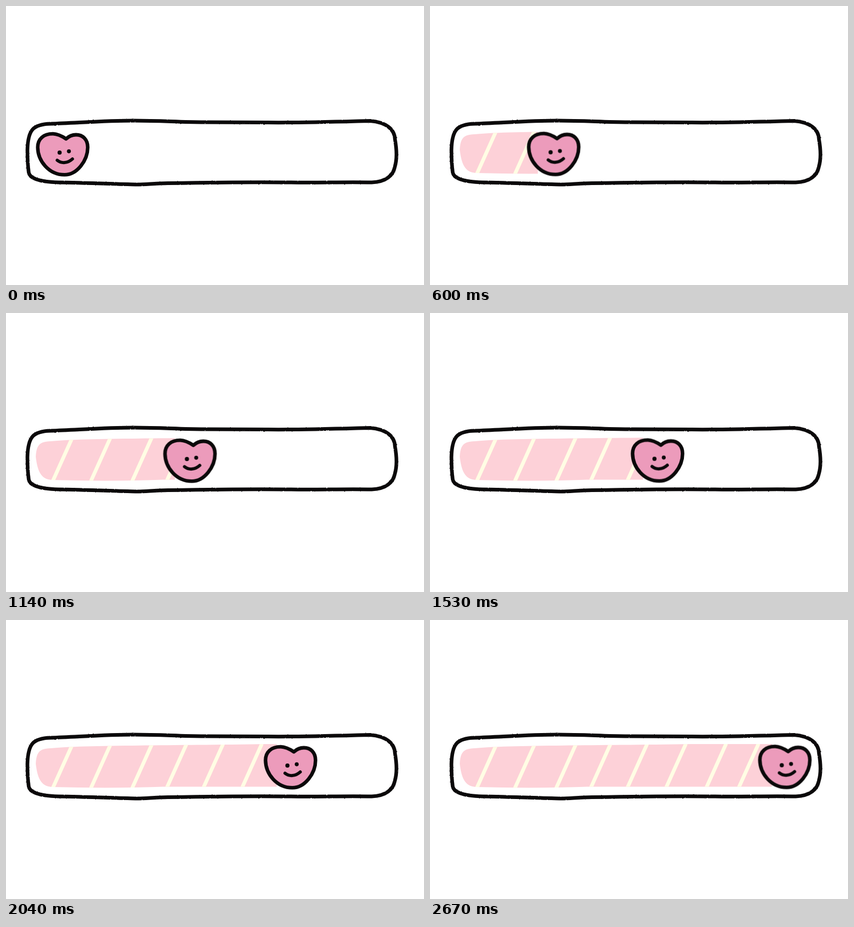
Animation of 800 by 533 pixels, one loop 2.7 s. Source, as an HTML page:

```html
<!DOCTYPE html>
<html lang="en">
<head>
<meta charset="utf-8">
<title>Heart loading bar</title>
<style>
  html, body { margin: 0; width: 100%; height: 100%; overflow: hidden; background: #fff; }
  svg { display: block; width: 100%; height: 100%; }
  path { fill: none; stroke-linecap: round; stroke-linejoin: round; }
  .ink { stroke: #0b090a; }
  .eye { fill: #0b090a; }
  #heart { animation: slide 2.7s steps(90, end) infinite; }
  #cover { animation: reveal 2.7s infinite; }
  @keyframes slide {
    to { transform: translate(577px, -2.6px); }
  }
  /* The bar catches up behind the heart, then follows it. */
  @keyframes reveal {
    0% { transform: translateX(0); animation-timing-function: steps(9, end); }
    10% { transform: translateX(78px); animation-timing-function: steps(81, end); }
    100% { transform: translateX(604px); }
  }
</style>
</head>
<body>
<svg viewBox="0 0 800 533">
  <defs>
    <filter id="rough" filterUnits="userSpaceOnUse" x="0" y="180" width="800" height="200" color-interpolation-filters="sRGB">
      <feTurbulence type="fractalNoise" baseFrequency=".3" numOctaves="2" seed="4"/>
      <feDisplacementMap in="SourceGraphic" scale="2" xChannelSelector="R" yChannelSelector="G"/>
    </filter>
    <clipPath id="bar">
      <path d="M57 275C58 250 66 246 86 245C140 239 300 240 500 237H690V318.5H300Q200 322 88 319C66 318 60 300 57 275Z"/>
    </clipPath>
  </defs>

  <g clip-path="url(#bar)">
    <rect x="50" y="230" width="660" height="100" fill="#fdd1d8"/>
    <path id="stripes" stroke="#fffde4" stroke-width="7"/>
  </g>
  <rect id="cover" x="57" y="229" width="660" height="98" fill="#fff"/>

  <path class="ink" stroke-width="7" filter="url(#rough)" d="M41 275
    C42 236 52 226 85 225C140 223 190 219 245 219S330 222 380 222S470 222 500 222.5S640 221 697 219.5
    C728 222 744 236 744.5 255C748 275 748 295 744 308
    C741 323 728 336 700 337C640 336 600 338 540 337S340 338 310 338.5S270 341 250 341S150 337.5 100 337
    C60 336 45 328 43.5 318Q41 300 41 275Z"/>

  <g id="heart">
    <path class="ink" stroke-width="6.8" style="fill:#ec9bbb" d="M115 253.8
      C106 248 99 244.4 90 244.2C72 244 60.7 254 60.7 270C61 296 82 322.4 112 322.4
      C136 322.4 156.4 295 156.4 270C156.4 255 147 246 134 246C125 246 119 250 115 253.8Z"/>
    <circle class="eye" cx="102.6" cy="280" r="4"/>
    <circle class="eye" cx="120.4" cy="277.6" r="3.8"/>
    <path class="ink" stroke-width="6" d="M98 294.6C106 301 118 301 127.2 292.2"/>
  </g>
</svg>
<script>
  // Parallel slanted stripes, spaced a little unevenly by hand.
  const feet = [90, 163, 242, 308, 378, 452, 529, 591];
  const slant = 37;
  document.getElementById('stripes').setAttribute('d',
    feet.map(x => `M${x} 320l${slant} -82`).join(''));
</script>
</body>
</html>
```
